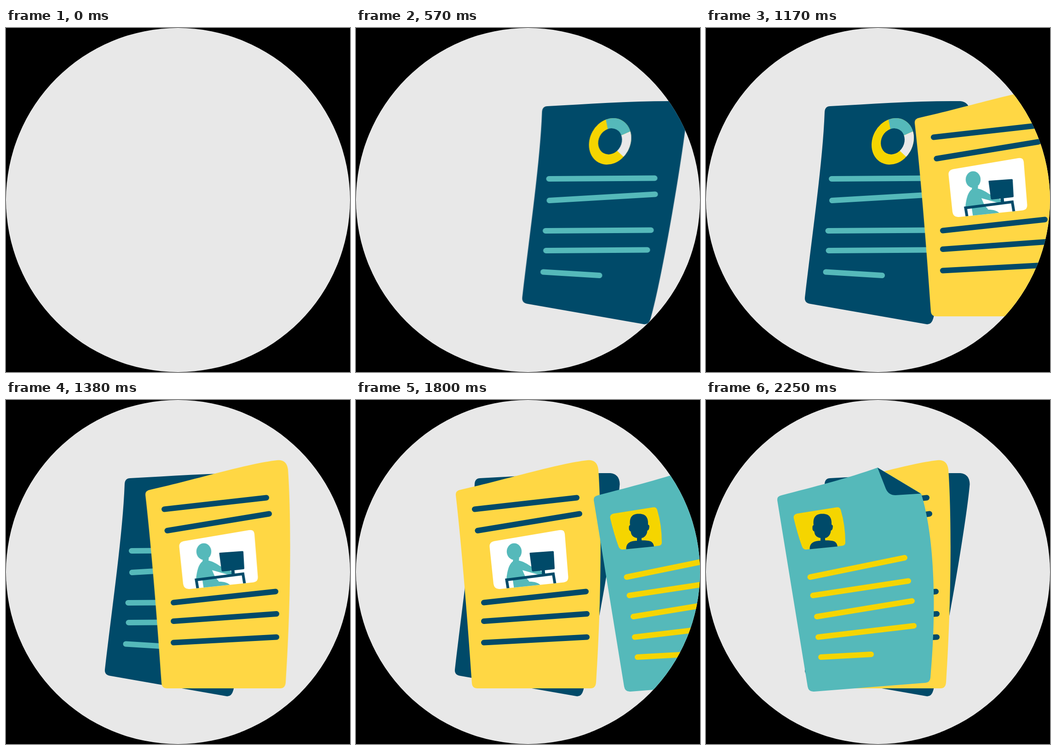
An HTML page for the animation above (3.75 s loop, 748 px wide and 748 px high).

```html
<!DOCTYPE html>
<html lang="en">
<head>
<meta charset="utf-8">
<title>Stack of pages</title>
<style>
  :root { --navy: #004a69; --teal: #55b9ba; --gold: #f5d500; --sun: #ffd744; --grey: #e8e8e8; }
  html, body { margin: 0; width: 100%; height: 100%; overflow: hidden; background: #000; }
  svg { display: block; width: 100%; height: 100%; }
  .navy { fill: var(--navy); }
  .teal { fill: var(--teal); }
  .gold { fill: var(--gold); }
  .sun { fill: var(--sun); }
  .grey { fill: var(--grey); }
  .lines { fill: none; stroke-width: 12; stroke-linecap: round; }
  .page { animation: 3750ms infinite; }

  /* Every page glides in at constant speed, one step per 30 ms. */
  #report { animation-name: report; }
  #article { animation-name: article; }
  #resume { animation-name: resume; }
  @keyframes report {
    0% { transform: translateX(688px); animation-timing-function: steps(24); }
    19.2% { transform: translateX(4px); animation-timing-function: step-end; }
    20%, 100% { transform: none; }
  }
  @keyframes article {
    0%, 20% { transform: translateX(538.3px); animation-timing-function: steps(25); }
    40%, 100% { transform: translateX(0); }
  }
  @keyframes resume {
    0%, 40% { transform: translateX(603.3px); animation-timing-function: steps(25); }
    60%, 100% { transform: translateX(0); }
  }
</style>
</head>
<body>
<svg viewBox="0 0 748 748">
  <defs>
    <clipPath id="disc"><circle cx="374" cy="374" r="374"/></clipPath>
    <clipPath id="ring"><ellipse cx="406" cy="246.5" rx="43.8" ry="52.4" transform="rotate(29 406 246.5)"/></clipPath>
    <path id="picture" d="M290.5 319Q290 309 300 307L442 283Q453 281 454 291L461.5 385Q462 395 452 396.5L313 411Q301 412 299 400Z"/>
    <clipPath id="frame"><use href="#picture"/></clipPath>
  </defs>

  <g clip-path="url(#disc)">
    <rect class="grey" width="748" height="748"/>

    <g id="report" class="page">
      <path class="navy" d="M215 586C232 440 254 290 258 182Q259 170 270 170C360 165 460 158 553 159Q573 161 573.5 183C567 262 518 552 494 632Q490 646 479 644L225 599.500Q214 597 215 586Z"/>
      <g clip-path="url(#ring)">
        <rect class="gold" x="350" y="190" width="110" height="115"/>
        <path class="teal" d="M402 225L393 180H470L468 217L425 236Z"/>
        <path class="grey" d="M425 236L468 217L470 300L448 292L416 262Z"/>
      </g>
      <ellipse class="navy" cx="406" cy="246.5" rx="24.9" ry="29.3" transform="rotate(28 406 246.5)"/>
      <path class="lines" stroke="var(--teal)" d="M273 328L503 326.5M274 375L504 361.5M265.500 441L495 439.5M266.5 484L487 482.5M260.5 530.5L383 538"/>
    </g>

    <g id="article" class="page">
      <path class="sun" d="M252 616C244 500 231 330 217 207Q216 197 228 195C330 172 440 138 503 131Q524 129 527 151C534 250 534 430 522 614Q521 627 510 627H264Q253 627 252 616Z"/>
      <path class="lines" stroke="var(--navy)" d="M258 237.5L480 212.5M264.5 284L486 247.5M278 440.5L500 416.5M278 481L502 465M278 527.5L502 515.5"/>
      <use href="#picture" fill="#fff"/>
      <g clip-path="url(#frame)">
        <ellipse class="teal" cx="344" cy="329.500" rx="16.2" ry="18"/>
        <path class="teal" d="M342 344H355L354 349C363 351 372 356 379 361L404 373Q409 380 396 379.500L362 370L368 384L377 395C388 395 398 397 404 406L344 412L341 392H327C328 378 331 358 341 351Z"/>
        <path class="navy" d="M377.500 333.500Q377 332 379 332L428 328.500Q430 328.500 430 330L432 366Q432 368 430 368L385 373Q383 373 382.500 371Z"/>
        <path d="M407 369L408 380" stroke="var(--navy)" stroke-width="7"/>
        <path d="M331 412L327.500 391L429 378L433 402" fill="none" stroke="var(--navy)" stroke-width="6"/>
      </g>
    </g>

    <g id="resume" class="page">
      <path class="teal" d="M221 623L155 218Q154 209 165 207C230 190 310 170 373 147L468 204C495 290 503 440 488 604Q487 614 477 615L235 634Q223 635 221 623Z"/>
      <path class="navy" d="M373 147L467 203.500L412 207Q397 207 391 193Z"/>
      <path class="gold" d="M190.5 256Q190 249 198 247L283 233.5Q291 232 293 239Q303 272 303 310Q303 316 296 317L219 325Q212 326 209 319Q199 292 190.5 256Z"/>
      <path class="navy" d="M234 272C232 256 238 247 253 247.5C268 247 274 256 273 271Q277 272 275.5 278Q275 283 271.5 284C271 294 264 300 259 300V305C272 306 284 304 286 318.500L225.500 324.500C225 309 238 306 249 306V300C241 299 236 294 235.5 286Q231 284 231.5 278Q231 273 234 272Z"/>
      <path class="lines" stroke="var(--gold)" d="M226.5 385L432 343M232.5 425L440 393.5M241 471L448 437M244 515.5L452 491M250 559L359 553"/>
    </g>
  </g>
</svg>
</body>
</html>
```
